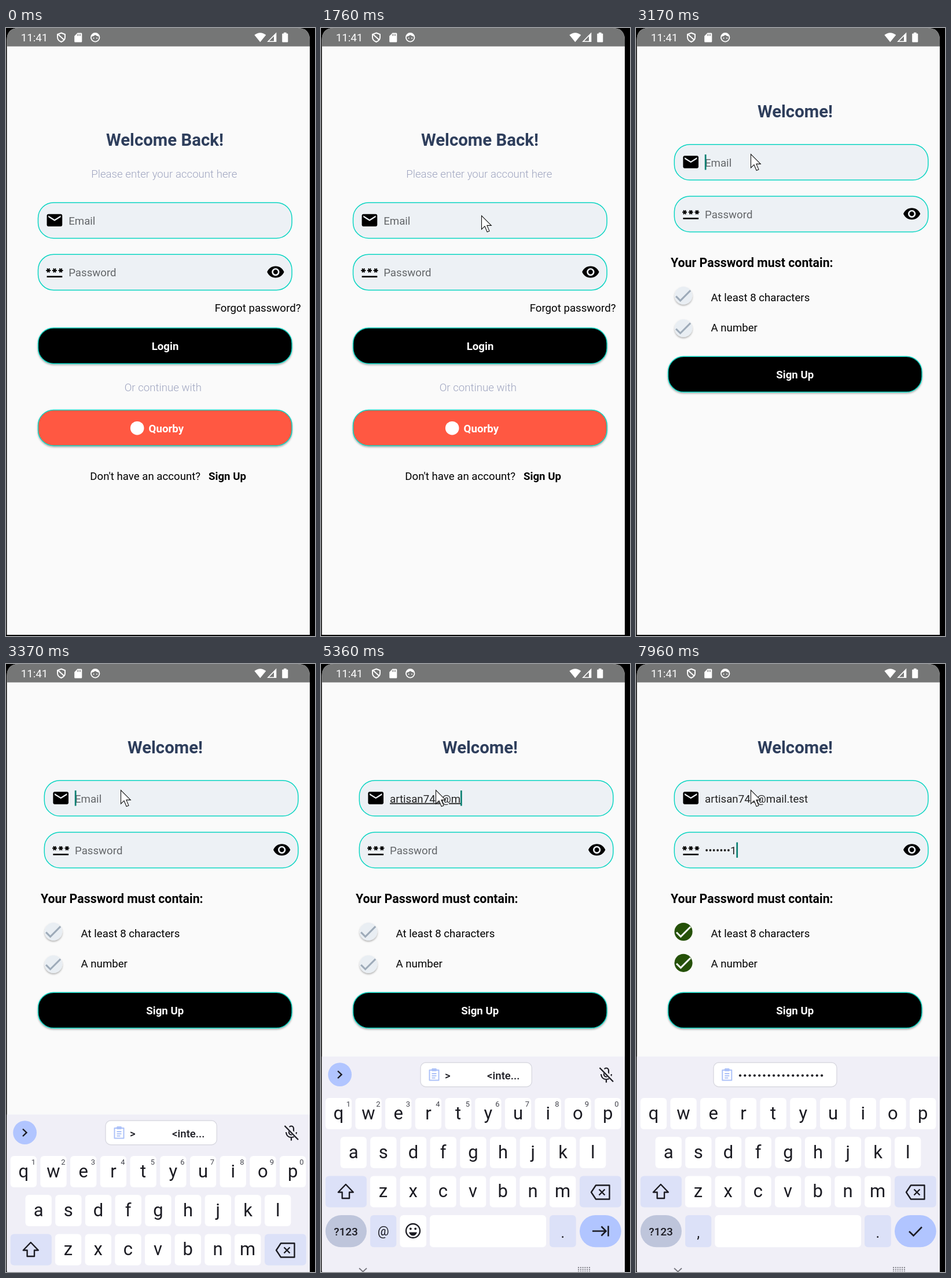
Animation, 534 px wide and 1048 px high, one loop 8000 ms. Source, as an HTML page:

```html
<!DOCTYPE html>
<html lang="en">
<head>
<meta charset="utf-8">
<title>Sign-up flow</title>
<style>
  html, body { margin: 0; width: 100%; height: 100%; overflow: hidden; background: #000; }
  svg { display: block; width: 100%; height: 100%; font-family: Roboto, sans-serif; }
  text { white-space: pre; }
</style>
</head>
<body>
<svg id="stage" viewBox="0 0 534 1048">
  <defs>
    <clipPath id="screen"><path d="M1.5 1046V21Q1.5 0 22 0H504Q525 0 525 21V1046Z"/></clipPath>
    <filter id="shadow" x="-10%" y="-20%" width="120%" height="150%">
      <feDropShadow dx="0" dy="1.8" stdDeviation="1.5" flood-color="#000" flood-opacity=".32"/>
    </filter>
  </defs>
  <rect width="534" height="1048"/>
  <g clip-path="url(#screen)">
    <rect width="534" height="1048" fill="#fafafa"/>
    <g id="login"></g>
    <g id="signup"></g>
    <g id="status"></g>
  </g>
  <g id="keyboard"></g>
  <path id="pointer" d="M.5 .5V24L6 18.7L10.2 28.5L14 26.9L9.9 17.4H17.3Z" fill="#fff" stroke="#111" stroke-width="1.1"/>
</svg>
<script>
const $ = id => document.getElementById(id);
const LOOP = 8000;
const EMAIL = 'artisan748@mail.test';
const TEAL = '#0bd5c2';

// 24-unit icon shapes
const ICON = {
  mail: 'M20 4H4c-1.1 0-2 .9-2 2v12c0 1.1.9 2 2 2h16c1.1 0 2-.9 2-2V6c0-1.1-.9-2-2-2zm0 4l-8 5-8-5V6l8 5 8-5z',
  star: 'M3.15 12.95L4 11.47l.85 1.48 1.3-.75-.85-1.48H7v-1.5H5.3l.85-1.47L4.85 7 4 8.47 3.15 7l-1.3.75.85 1.47H1v1.5h1.7l-.85 1.48z',
  eye: 'M12 4.5C7 4.5 2.73 7.61 1 12c1.73 4.39 6 7.5 11 7.5s9.27-3.11 11-7.5c-1.73-4.39-6-7.5-11-7.5zM12 17c-2.76 0-5-2.24-5-5s2.24-5 5-5 5 2.24 5 5-2.24 5-5 5zm0-8c-1.66 0-3 1.34-3 3s1.34 3 3 3 3-1.34 3-3-1.34-3-3-3z',
  check: 'M9 16.17L4.83 12l-1.42 1.41L9 19 21 7l-1.41-1.41z'
};

function text(x, y, content, {size = 18.67, weight = 400, fill = '#000', anchor = 'start', id = ''} = {}) {
  return `<text ${id && `id="${id}"`} x="${x}" y="${y}" font-size="${size}" font-weight="${weight}" fill="${fill}" text-anchor="${anchor}">${content}</text>`;
}
const mid = (x, y, content, style) => text(x, y, content, {anchor: 'middle', ...style});
const box = (x, y, w, h, r, fill, extra = '') =>
  `<rect x="${x}" y="${y}" width="${w}" height="${h}" rx="${r}" fill="${fill}" ${extra}/>`;
const line = (d, color, width, extra = '') =>
  `<path d="${d}" fill="none" stroke="${color}" stroke-width="${width}" ${extra}/>`;
const disc = (x, y, r, fill, extra = '') => `<circle cx="${x}" cy="${y}" r="${r}" fill="${fill}" ${extra}/>`;
const repeat = (n, draw) => Array.from({length: n}, (_, i) => draw(i)).join('');
const icon = (d, cx, cy, scale = 1.333, fill = '#000') =>
  `<path transform="translate(${cx} ${cy}) scale(${scale}) translate(-12 -12)" d="${d}" fill="${fill}"/>`;

const pill = (x, y, fill, extra = '') =>
  box(x, y, 438.6, 61.4, 26.7, fill, `stroke="${TEAL}" stroke-width="1.5" ${extra}`);
const button = (y, fill) => pill(55.5, y, fill, 'filter="url(#shadow)"');

function field(x, y, label, id) {
  const secret = label === 'Password';
  const cx = x + 28.4, cy = y + 30.3;
  const lead = secret
    ? [0, 8, 16].map(dx => icon(ICON.star, cx + dx * 1.333, cy)).join('') + box(cx - 13.3, cy + 6.7, 26.7, 2.6, 0, '#000')
    : icon(ICON.mail, cx, cy);
  return pill(x, y, '#edf1f5') + lead + (secret ? icon(ICON.eye, x + 410.4, cy) : '') +
    text(x + 52.7, y + 38, label, {fill: '#636669', id});
}

const muted = {weight: 300, fill: '#9fa5c0'};
const title = {size: 29.4, weight: 700, fill: '#2e3e5c'};
const white = {weight: 700, fill: '#fff'};

$('login').innerHTML =
  mid(274.5, 202.5, 'Welcome Back!', title) +
  mid(273.3, 257.6, 'Please enter your account here', muted) +
  field(55.5, 301, 'Email', 'loginEmail') + field(55.5, 390.3, 'Password', 'loginPassword') +
  text(509.5, 489, 'Forgot password?', {anchor: 'end'}) +
  button(517, '#000') + mid(275, 555, 'Login', white) +
  mid(271.3, 626, 'Or continue with', muted) +
  button(658.5, '#ff5943') + disc(226.7, 689.7, 11.8, '#fff') + text(246.6, 697, 'Quorby', white) +
  text(145.3, 778.6, "Don't have an account?") + text(350, 778.6, 'Sign Up', {weight: 700});

const badge = (y, doneY) =>
  `<g class="todo">${disc(82, y, 15.3, '#e9eef3', 'filter="url(#shadow)"')}${icon(ICON.check, 81.3, y, 1.55, '#9eabb9')}</g>` +
  `<g class="done">${disc(82, doneY, 15.6, '#255108')}${icon(ICON.check, 81.8, doneY, 1.5, '#f4f7f4')}</g>`;

$('signup').innerHTML =
  mid(275, 154.3, 'Welcome!', title) +
  field(66.3, 200.7, 'Email', 'emailHint') + field(66.3, 290, 'Password', 'passwordHint') +
  text(119, 238.7, '', {fill: '#222', id: 'email'}) +
  text(119, 328, '', {fill: '#222', id: 'password'}) +
  `<rect id="caret" width="2.7" height="26.5" fill="#0b8072"/>` +
  text(60, 412.2, 'Your Password must contain:', {size: 21.33, weight: 700}) +
  badge(461.3, 461.5) + text(129.5, 470.5, 'At least 8 characters') +
  badge(517.5, 515.3) + text(129.5, 523, 'A number') +
  button(566.2, '#000') + mid(274.7, 604.2, 'Sign Up', white);

$('status').innerHTML =
  box(0, 0, 534, 31.7, 0, '#757676') +
  text(25.8, 23, '11:41', {fill: '#fff'}) +
  line('M95.5 8.5L102 11V16Q102 21.500 95.500 24Q89 21.500 89 16V11Z M90 11L101 21', '#fff', 1.9) +
  `<path d="M123.500 8.500H130Q131.300 8.500 131.300 10V23Q131.300 24.500 130 24.500H119.500Q118.200 24.500 118.200 23V14Z" fill="#fff"/>` +
  line('M123.500 10.500V13.500M126 10.500V13.500M128.500 10.500V13.500', '#757676', 1.2) +
  disc(154.2, 16.3, 7.3, 'none', 'stroke="#fff" stroke-width="1.8"') +
  `<path d="M147.500 15Q149 9 154.200 9Q159.500 9 161 15Q157 14 154.200 12Q151 14.500 147.500 15Z" fill="#fff"/>` +
  disc(151.5, 17.6, 1, '#fff') + disc(157, 17.6, 1, '#fff') +
  `<path d="M429.300 12Q439.300 4.300 449.300 12L439.300 24.300Z" fill="#fff"/>` +
  line('M466.500 9.500V23.300H453Z', '#fff', 1.6) +
  `<path d="M463 12.500L467 9V24H463Z" fill="#fff"/>` +
  `<path d="M480 7.800H484.500V9.500H486.200Q487.300 9.500 487.300 10.600V23.400Q487.300 24.500 486.200 24.500H478.300Q477.200 24.500 477.200 23.400V10.600Q477.200 9.500 478.300 9.500H480Z" fill="#fff"/>`;

const INK = '#1b1b22', SOFT = '#dce1f8', BLUE = '#b1c5ff';
const keyRow = (letters, x0, y) => repeat(letters.length, i => {
  const x = x0 + i * 51.7;
  return box(x, y, 45.3, 54, 6, '#fff') + mid(x + 22.6, y + 36.5, letters[i], {size: 31, fill: INK});
});
const clipboard = x =>
  line(`M${x - 8} 700H${x + 8}V717.500H${x - 8}ZM${x - 4} 706H${x + 4}M${x - 4} 709.700H${x + 4}M${x - 4} 713.400H${x + 2}`, '#adc2f8', 2, 'stroke-linejoin="round"') +
  box(x - 4.5, 697, 9, 5, 1.5, '#adc2f8');
const chip = (x, w) => box(x, 687, w, 41.7, 9, '#fff', 'stroke="#d9d9e1" stroke-width="1.4"');

const emailKeys =
  disc(32.6, 707.7, 20.4, BLUE) + line('M29 701.500L35.500 707.700L29 714', INK, 2.4) +
  chip(172, 192.3) + clipboard(195.5) +
  text(214, 716, '&gt;', {fill: INK, weight: 500}) + text(287, 716, '&lt;inte...', {fill: INK, weight: 500}) +
  box(489, 696.5, 8, 15, 4, 'none', `stroke="${INK}" stroke-width="2.2"`) +
  line('M484 707Q485 716 493 716Q501 716 502 707M493 716V721.500', INK, 2.2) +
  line('M482.500 695L506 719', '#f0eff7', 6) + line('M481.500 696L505 720', INK, 2.3) +
  repeat(10, i => mid(47.5 + i * 51.5, 763, (i + 1) % 10, {size: 13, fill: '#44454e'})) +
  mid(107.6, 985, '@', {size: 22, fill: INK}) +
  box(136.4, 950, 45.6, 55.3, 6, '#fff') +
  disc(159, 977, 12, 'none', `stroke="${INK}" stroke-width="2.3"`) +
  disc(154.8, 973.5, 1.9, INK) + disc(163.2, 973.5, 1.9, INK) +
  `<path d="M152 979.500H166Q164 985.500 159 985.500Q154 985.500 152 979.500Z" fill="${INK}"/>` +
  box(188, 950, 201, 55.3, 6, '#fff') +
  line('M469 977.500H491M484.500 969.500L492.500 977.500L484.500 985.500M496.500 968.500V986.500', INK, 2.6);

const passwordKeys =
  chip(134, 213) + clipboard(157.3) + repeat(18, i => disc(180 + i * 8.3, 709.3, 2.1, INK)) +
  mid(107.6, 989, ',', {size: 25, fill: INK}) +
  box(136.4, 950, 252.6, 55.3, 6, '#fff') +
  line('M472 978L479.500 985.300L494 970.500', INK, 2.6);

$('keyboard').innerHTML =
  box(1.5, 676.6, 523.5, 372, 0, '#f0eff7') +
  keyRow('qwertyuiop', 7.7, 748) + keyRow('asdfghjkl', 33.5, 815) + keyRow('zxcvbnm', 84.9, 882.5) +
  box(7.7, 882.5, 71.2, 54, 6, SOFT) + box(447, 882.5, 71.8, 54, 6, SOFT) +
  line('M42.800 897L55.800 910.500H49V921H36.600V910.500H29.800Z', INK, 2.4, 'stroke-linejoin="round"') +
  line('M475 898.500H498.500V922.500H475L467 910.500ZM480.500 905.500L490.500 915.500M490.500 905.500L480.500 915.500', INK, 2.4, 'stroke-linejoin="round"') +
  box(7.7, 950, 71.2, 55.3, 27.6, '#bec5db') + mid(43, 985, '?123', {size: 19, weight: 500, fill: INK}) +
  box(85, 950, 45.3, 55.3, 6, SOFT) + box(395, 950, 45.7, 55.3, 6, SOFT) +
  mid(417.8, 989, '.', {size: 25, fill: INK}) +
  box(447, 950, 71.8, 55.3, 27.6, BLUE) +
  `<g id="emailKeys">${emailKeys}</g><g id="passwordKeys">${passwordKeys}</g>` +
  line('M66 1041.500L72.500 1047.500L79 1041.500', '#77777f', 1.8) +
  repeat(18, i => box(444 + i % 6 * 3.8, 1039.5 + Math.floor(i / 6) * 3.8, 2, 2, 0, '#77777f'));

// Each step overrides part of the state from its time onward.
const at = (x, y) => ({x, y});
const typed = n => ({email: n});
const secret = (n, last) => ({password: n, last});
const STEPS = [
  [0, {x: -99, y: 0, page: 'login', shift: 0, focus: '', email: 0, password: 0, last: '', keys: Infinity, done: false}],
  [200, at(513, 610)], [400, at(400, 564)], [600, at(293, 650)],
  [750, at(330, 725)], [950, at(395, 770)], [1150, at(420, 779)],
  [1350, at(384, 690)], [1560, at(300, 420)], [1760, at(277, 323)],
  [2160, {...at(245, 321), page: 'signup', shift: 7}],
  [2360, {...at(227, 275), shift: 0}], [2560, at(206, 232)], [2770, at(198, 217)],
  [3170, {focus: 'email'}], [3370, {keys: 100}], [3570, {keys: 0}],
  [3770, typed(1)], [3970, typed(4)], [4170, typed(6)],
  [4370, typed(7)], [4570, typed(8)], [4770, typed(10)], [4970, typed(11)],
  [5360, typed(12)], [5560, typed(14)], [5760, typed(16)], [5960, typed(18)], [6160, typed(20)],
  [6360, {focus: 'password'}],
  [6560, secret(2, 'e')], [6760, secret(4, 't')], [7360, secret(6, 'n')], [7560, secret(7, 'g')],
  [7960, {...secret(8, '1'), done: true}]
];

const show = (el, on) => el.setAttribute('display', on ? 'inline' : 'none');
const move = (el, x, y) => el.setAttribute('transform', `translate(${x} ${y})`);

function render(time) {
  const s = Object.assign({}, ...STEPS.filter(([start]) => start <= time).map(([, change]) => change));
  show($('login'), s.page === 'login');
  show($('signup'), s.page === 'signup');
  move($('signup'), s.shift, 0);
  move($('pointer'), s.x, s.y);

  $('email').textContent = EMAIL.slice(0, s.email);
  $('email').setAttribute('text-decoration', s.focus === 'email' ? 'underline' : 'none');
  $('password').textContent = '•'.repeat(Math.max(0, s.password - 1)) + s.last;
  show($('emailHint'), !s.email);
  show($('passwordHint'), !s.password);

  show($('caret'), s.focus);
  if (s.focus) {
    const width = s[s.focus] ? $(s.focus).getComputedTextLength() : 0;
    move($('caret'), 118.8 + width, s.focus === 'email' ? 218 : 307.4);
  }
  document.querySelectorAll('.todo').forEach(el => show(el, !s.done));
  document.querySelectorAll('.done').forEach(el => show(el, s.done));

  show($('keyboard'), s.keys < Infinity);
  if (s.keys < Infinity) move($('keyboard'), 0, s.keys);
  show($('emailKeys'), s.focus === 'email');
  show($('passwordKeys'), s.focus === 'password');
}

const begin = performance.now();
function tick() {
  render((performance.now() - begin) % LOOP);
  requestAnimationFrame(tick);
}
tick();
</script>
</body>
</html>
```
